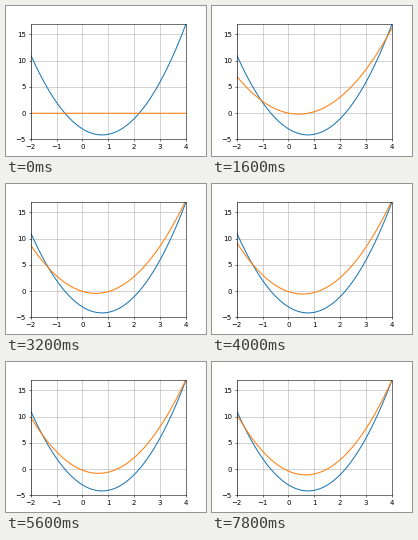
Animation of 200 by 150 pixels, one loop 8000 ms. Source, as a matplotlib script:

```python
import numpy as np
import matplotlib.pyplot as plt
from matplotlib.animation import FuncAnimation
from matplotlib.transforms import Affine2D

W, H = 200, 150
FRAMES, STEP_MS = 40, 200
NUDGE = 0.2  # pixels; makes frame and grid snap to the lower half pixel

# Coefficients are ordered constant, linear, quadratic.
GOAL = np.array([-3.0, -3.0, 2.0])

# The fitting error starts at -GOAL and shrinks as three decaying modes.
SLOW = 3.62 * np.array([1.0, 0.245, -0.129])
MID = 1.84 * np.array([-0.33, 1.0, -0.164])
FAST = -GOAL - SLOW - MID
RATES = 0.9925, 0.945, 0.743


def coefs(step):
    error = sum(r ** step * mode for r, mode in zip(RATES, (SLOW, MID, FAST)))
    return GOAL + error


def parabola(c, x):
    return c[0] + c[1] * x + c[2] * x ** 2


x = np.linspace(-2, 4, 121)

fig = plt.figure(figsize=(W / 50, H / 50), dpi=50)
ax = fig.add_axes([(25 - NUDGE) / W, (16.5 + NUDGE) / H, 155 / W, 115.5 / H])
ax.set(xlim=(-2, 4), ylim=(-5, 17),
       xticks=range(-2, 5), yticks=range(-5, 16, 5))
ax.grid(True)

# Curves are not snapped, so they undo the nudge.
place = ax.transData + Affine2D().translate(NUDGE, -NUDGE)
ax.plot(x, parabola(GOAL, x), color="tab:blue", transform=place)
fit, = ax.plot(x, np.zeros_like(x), color="tab:orange", snap=False,
               transform=place)


def update(step):
    fit.set_ydata(parabola(coefs(step), x))
    return fit,


anim = FuncAnimation(fig, update, frames=FRAMES, interval=STEP_MS,
                     repeat=True, repeat_delay=0)
plt.show()
```
